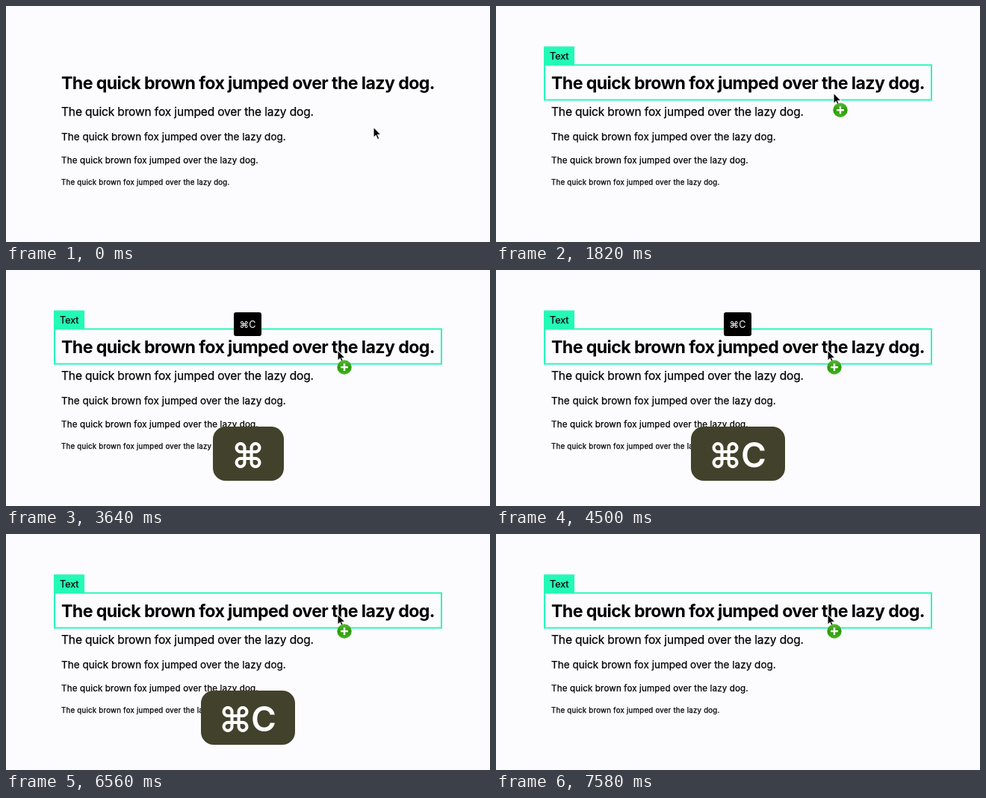
Animation of 648 by 318 pixels, one loop 8 s. Source, as an HTML page:

```html
<!DOCTYPE html>
<html lang="en">
<head>
<meta charset="utf-8">
<title>Copy shortcut</title>
<style>
  html, body { margin: 0; width: 100%; height: 100%; overflow: hidden; background: #fcfcfe; }
  svg { display: block; width: 648px; height: 318px; }
  text { font-family: Inter, "Noto Sans", sans-serif; font-optical-sizing: none; }
  .body { stroke: #000; stroke-width: .25px; }
  .keys { font-size: 46px; font-weight: 600; fill: #fff; text-anchor: middle; }
</style>
</head>
<body>
<svg viewBox="0 0 648 318">
  <defs>
    <linearGradient id="green" x2="0" y2="1">
      <stop stop-color="#5cbc3a"/>
      <stop offset=".5" stop-color="#2b9a08"/>
      <stop offset="1" stop-color="#45b31f"/>
    </linearGradient>
  </defs>

  <g id="lines"></g>

  <g id="highlight">
    <rect x="65" y="79.5" width="518" height="47" fill="none" stroke="#2af6bb" stroke-width="2"/>
    <rect x="64" y="54.5" width="41" height="25" fill="#22fab6"/>
    <text class="body" x="72" y="72" font-size="12.6">Text</text>
  </g>

  <g id="toast">
    <rect x="305" y="57" width="37" height="32" rx="3"/>
    <text x="323.5" y="78" font-size="12.6" fill="#fff" text-anchor="middle">⌘C</text>
  </g>

  <g id="overlay">
    <rect id="panel" y="211" height="73" rx="17" fill="#42422c"/>
    <text class="keys" y="266"><tspan id="command">⌘</tspan><tspan id="letter" x="345">C</tspan></text>
  </g>

  <g id="cursor">
    <path d="M0 0V14.5L3.2 11.4L5.5 16.8L7.9 15.8L5.6 10.5H10.2Z" stroke="#fff" stroke-width="1.1"/>
    <g id="badge" transform="translate(9 23)">
      <circle r="9.7" fill="url(#green)"/>
      <path d="M-5 0H5M0 -5V5" stroke="#fff" stroke-width="2.4"/>
    </g>
  </g>
</svg>

<script>
const LOOP = 8000;
const SENTENCE = "The quick brown fox jumped over the lazy dog.";
const $ = id => document.getElementById(id);
const clamp = v => Math.min(1, Math.max(0, v));
const progress = (t, from, to) => clamp((t - from) / (to - from));
const mix = (a, b, p) => a + (b - a) * p;
const smooth = p => p * p * (3 - 2 * p);
const show = (id, visible) => $(id).style.display = visible ? "" : "none";

// baseline, font size, letter spacing, weight
const lines = [
  [112, 23.2, -0.625, 700],
  [148, 15.5, -0.137, 400],
  [181, 13.5, 0.025, 400],
  [212, 11.6, 0.145, 400],
  [241, 9.7, 0.234, 400],
];
$("lines").innerHTML = lines.map(([y, size, spacing, weight]) =>
  `<text class="${weight > 400 ? "heading" : "body"}" x="74" y="${y}" font-size="${size}" letter-spacing="${spacing}" font-weight="${weight}">${SENTENCE}</text>`
).join("");

function draw(t) {
  const move = smooth(progress(t, 1380, 1980));
  const x = t < 1280 ? 492 : mix(490, 444, move);
  const y = t < 1280 ? 163 : mix(161, 108, move);
  const hovering = y < 127;
  $("cursor").setAttribute("transform", `translate(${x} ${y})`);
  show("badge", hovering);
  show("highlight", hovering);

  $("toast").style.opacity = progress(t, 2100, 2340) - progress(t, 5200, 5440);

  const combo = t >= 4100;
  show("overlay", t >= 3280 && t < 7300);
  show("letter", combo);
  $("command").setAttribute("x", combo ? 307 : 324);
  $("panel").setAttribute("x", combo ? 261 : 277);
  $("panel").setAttribute("width", combo ? 126 : 95);
  $("overlay").style.opacity = (1 - progress(t, 6560, 7300)) ** 3;
}

const start = performance.now();
function tick() {
  draw((performance.now() - start) % LOOP);
  requestAnimationFrame(tick);
}
tick();
</script>
</body>
</html>
```
